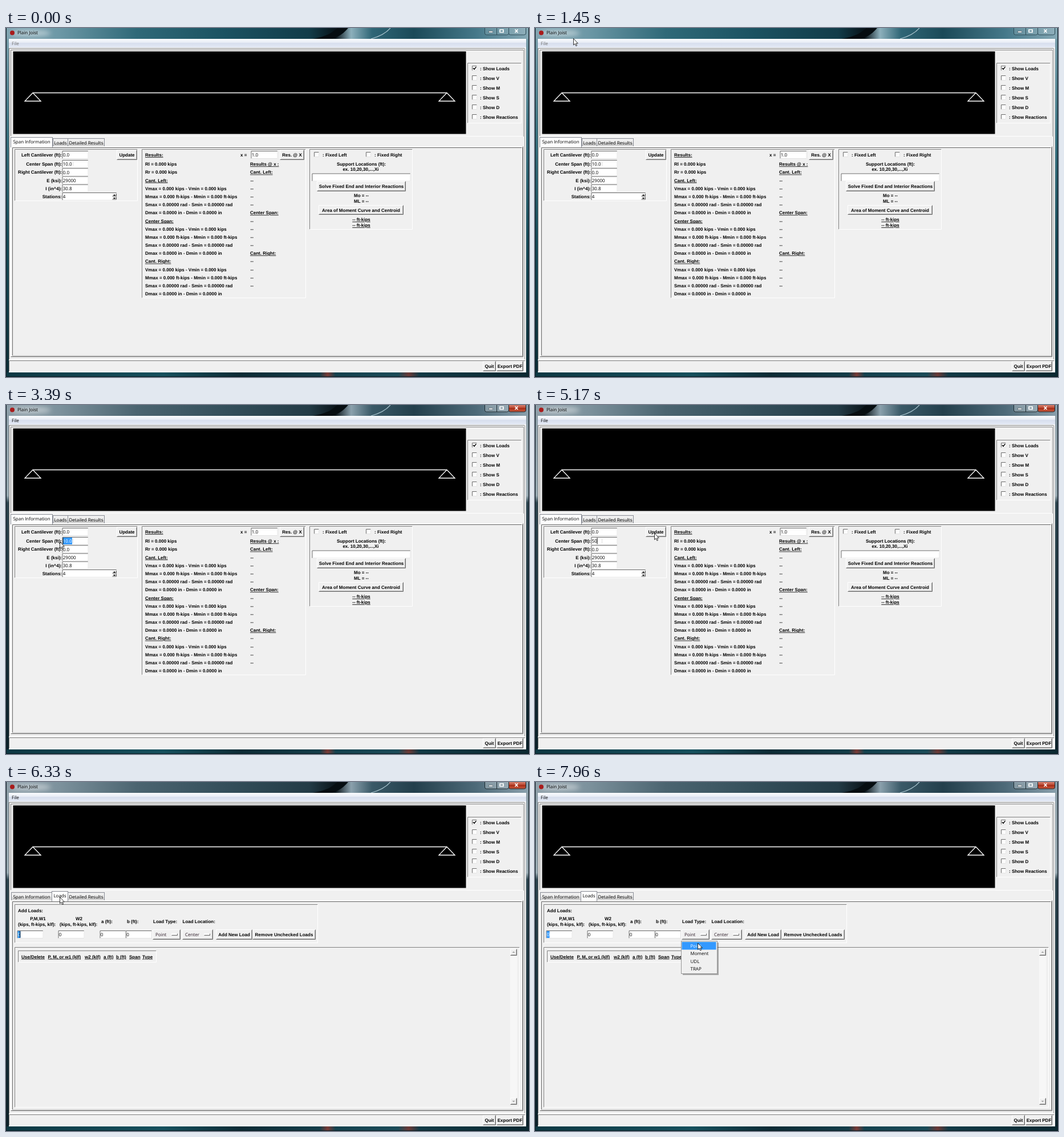
Recreate the animation shown at these times as an HTML page. Size 917x611 px, loop 8000 ms.

```html
<!DOCTYPE html>
<html lang="en">
<head>
<meta charset="utf-8">
<title>Plain Joist</title>
<style>
html, body { margin: 0; width: 100%; height: 100%; overflow: hidden; background: #f0f0f0; }
svg { display: block; width: 917px; height: 611px; }
text { font: 8px "Open Sans", "Noto Sans", sans-serif; white-space: pre; text-rendering: geometricPrecision; }
.b { font: bold 8px "Liberation Sans", Arial, sans-serif; }
.u { text-decoration: underline; }
</style>
</head>
<body>
<svg id="stage" viewBox="0 0 917 611" xmlns="http://www.w3.org/2000/svg"></svg>
<script>
const DURATION = 8000;
const FACE = '#f0f0f0', DARK = '#696969', MID = '#a0a0a0', BLUE = '#3399ff';

// ---- drawing helpers; text is placed by its vertical centre ----
const rect = (x, y, w, h, fill, extra = '') =>
  `<rect x="${x}" y="${y}" width="${w}" height="${h}" fill="${fill}" ${extra}/>`;
const path = (d, stroke, width = 1, fill = 'none') =>
  `<path d="${d}" stroke="${stroke}" stroke-width="${width}" fill="${fill}"/>`;
const group = (id, body, extra = '') => `<g id="${id}" ${extra}>${body}</g>`;
const text = (x, y, s, cls = '', anchor = 'start', fill = '#000', extra = '') =>
  `<text x="${x}" y="${y + 3}" class="${cls}" text-anchor="${anchor}" fill="${fill}" ${extra}>${s}</text>`;
const label = (x, y, s, anchor) => text(x, y, s, 'b', anchor);
const heading = (x, y, s, anchor) => text(x, y, s, 'b u', anchor);

function bevel(x, y, w, h, topLeft, bottomRight, fill = 'none') {
  const l = x + .5, t = y + .5, r = x + w - .5, b = y + h - .5;
  return rect(x, y, w, h, fill) +
    path(`M${l} ${b}V${t}H${r}`, topLeft) + path(`M${l} ${b}H${r}V${t}`, bottomRight);
}
const sunken = (x, y, w, h, fill) => bevel(x, y, w, h, '#808080', '#fff', fill);
const entry = (x, y, w, h, value = '') =>
  bevel(x, y, w, h, DARK, '#e3e3e3', '#fff') + text(x + 1.3, y + h / 2 + .3, value);
const raised = (x, y, w, h) =>
  bevel(x, y, w, h, '#fff', DARK, FACE) + path(`M${x + 1.5} ${y + h - 1.5}H${x + w - 1.5}V${y + 1.5}`, MID, .8);
const button = (x, y, w, h, s) => raised(x, y, w, h) + label(x + w / 2, y + h / 2 + .4, s, 'middle');
const optionButton = (x, w, s) => raised(x, 258, w, 18) + text(x + 5, 267, s, '', 'start', '#2b1a26') +
  bevel(x + w - 16, 265, 11, 4, '#fff', DARK, FACE);
const check = (x, y, on) => bevel(x, y, 9, 9, DARK, '#e3e3e3', '#fff') +
  (on ? path(`M${x + 2} ${y + 4}l2 2.3 3.4-4.2`, '#000', 1.5) : '');
const tab = (x, y, w, s, fill) =>
  rect(x + .5, y + .5, w - 1, 208 - y, fill, 'stroke="#898c95"') + text(x + w / 2, y + 7.5, s, '', 'middle');

const gradient = (id, stops, vertical) =>
  `<linearGradient id="${id}" x2="${vertical ? 0 : 1}" y2="${vertical ? 1 : 0}">` +
  stops.map(([at, color]) => `<stop offset="${at}" stop-color="${color}"/>`).join('') + '</linearGradient>';

// ---- window parts ----
const defs = '<defs>' +
  gradient('idleTitle', [[0, '#7fa3b0'], [.1, '#6d98a6'], [.25, '#2f6978'], [.42, '#1b5261'], [.58, '#123c49'],
    [.63, '#081319'], [.66, '#8db0bc'], [.7, '#2f6676'], [.78, '#1b4a58'], [.9, '#46798a'], [1, '#86a9b6']]) +
  gradient('busyTitle', [[0, '#8d9ea8'], [.1, '#7d929d'], [.25, '#4b6470'], [.42, '#344f5b'], [.58, '#233b46'],
    [.63, '#0b151b'], [.66, '#8ba1ad'], [.7, '#3a5967'], [.78, '#233f4c'], [.9, '#4e6a79'], [1, '#8ba1ae']]) +
  gradient('idleSide', [[0, '#7fa3b0'], [.3, '#3a7382'], [.6, '#174b59'], [1, '#0b2c36']], true) +
  gradient('busySide', [[0, '#8d9ea8'], [.26, '#9aabb4'], [.28, '#2c444f'], [.65, '#162f3a'], [1, '#0b2029']], true) +
  gradient('foot', [[0, '#0d3843'], [.3, '#16505d'], [.45, '#0c2b35'], [.6, '#143d49'], [.615, '#7a3a35'],
    [.63, '#14414e'], [.75, '#1b4b58'], [.77, '#6b3835'], [.79, '#123a46'], [1, '#0a2831']]) +
  gradient('menuBar', [[0, '#fbfcfe'], [.45, '#e6ebf5'], [.5, '#d8dfee'], [1, '#e2e8f4']], true) +
  gradient('tabFace', [[0, '#f3f3f3'], [.5, '#ebebeb'], [.5, '#dddddd'], [1, '#cfcfcf']], true) +
  gradient('tabHot', [[0, '#eaf6fd'], [.5, '#d9f0fc'], [.5, '#bee6fd'], [1, '#a7d9f5']], true) +
  gradient('close', [[0, '#d99a8c'], [.5, '#c2523c'], [.55, '#a52c17'], [1, '#c9573a']], true) +
  '<filter id="blur" x="-20%" y="-100%" width="140%" height="300%"><feGaussianBlur stdDeviation="4"/></filter>' +
  '<clipPath id="picked"><rect id="pickedBox" y="232" width="0" height="12"/></clipPath></defs>';

const chrome = state => rect(0, 0, 917, 611, `url(#${state}Side)`) +
  rect(0, 0, 917, 19, `url(#${state}Title)`) +
  path('M538 19C566 14 575 6 580 0H600C592 9 586 14 572 19Z', 'none', 0, '#060d11') +
  path('M640 19C658 14 668 7 674 0', '#a8c3cd', 1.2) +
  rect(0, 603, 917, 8, 'url(#foot)') +
  path('M.5 0V611M916.5 0V611M0 610.5H917', '#0a1a20');

const controls = active => {
  const edge = active ? '#1c2a31' : '#2d4c58';
  return rect(839.5, -3, 42, 15, '#fff', `fill-opacity="${active ? .25 : .1}" stroke="${edge}" rx="3"`) +
    rect(881.5, -3, 30, 15, active ? 'url(#close)' : '#fff', `fill-opacity="${active ? 1 : .1}" stroke="${edge}" rx="3"`) +
    path('M860.5 0V12', edge) + rect(846.5, 5.5, 7, 2.5, '#fff', 'stroke="#45545c" stroke-width=".6"') +
    path('M866 3H872V7.5H866Z', '#fff', 1.7) + path('M892.5 2.5l5 5.5m0-5.5l-5 5.5', '#fff', 1.7);
};

const shell = group('idle', chrome('idle') + controls(false)) + group('busy', chrome('busy') + controls(true)) +
  '<ellipse cx="43" cy="9" rx="36" ry="6" fill="#fff" opacity=".45" filter="url(#blur)"/>' +
  '<circle cx="11" cy="8.5" r="4" fill="#a81c1c"/>' + text(20, 8.3, 'Plain Joist') +
  rect(5, 19, 907, 584, FACE) + rect(5, 19, 907, 15, 'url(#menuBar)') + path('M5 34.5H912', '#fff') +
  text(10, 26.5, 'File', '', 'start', '#6d6d6d', 'id="file"') +
  sunken(5, 35, 905, 546) + sunken(8, 38, 900, 152) + path('M907.5 38V190M909.5 36V580', MID) +
  rect(12.5, 41, 794, 144.5, '#000') +
  path('M47 113.5H773', '#fff', 1.5) +
  [47, 773].map(x => path(`M${x} 113.5l14 14.5h-28Z`, '#fff', 1.3)).join('') +
  sunken(809, 61, 95, 106) +
  ['Loads', 'V', 'M', 'S', 'D', 'Reactions'].map((s, i) =>
    check(817, 66 + 17 * i, !i) + label(831, 71 + 17 * i, ': Show ' + s)).join('') +
  sunken(5, 582, 906, 20) + button(836, 583, 23, 18, 'Quit') + button(860, 583, 47, 18, 'Export PDF');

const pane = bevel(8, 207, 899, 369, '#fff', DARK, FACE) + bevel(11, 209, 894, 365, DARK, '#fff') +
  path('M905.5 209V574H11', MID);

// ---- "Span Information" page ----
const rows = ['Left Cantilever (ft):', 'Center Span (ft):', 'Right Cantilever (ft):', 'E (ksi):', 'I (in^4):', 'Stations:'];
const values = ['0.0', '', '0.0', '29000', '30.8', '4'];
const rowY = [222, 238, 252.3, 266.5, 280.7, 295];

const extremes = [
  'Vmax = 0.000 kips - Vmin = 0.000 kips', 'Mmax = 0.000 ft-kips - Mmin = 0.000 ft-kips',
  'Smax = 0.00000 rad - Smin = 0.00000 rad', 'Dmax = 0.0000 in - Dmin = 0.0000 in'];
const spans = ['Cant. Left:', 'Center Span:', 'Cant. Right:'];
const resultY = i => 238.3 + 14.18 * i;

const results = label(244, resultY(0), 'Rl = 0.000 kips') + label(244, resultY(1), 'Rr = 0.000 kips') +
  heading(428, resultY(0), 'Results @ x :') +
  spans.map((s, i) => {
    const top = 2 + 5 * i;
    return heading(244, resultY(top), s) + heading(428, resultY(top - 1), s) +
      extremes.map((e, k) => label(244, resultY(top + 1 + k), e) + label(428.5, resultY(top + k), '--')).join('');
  }).join('');

const spanPage = tab(82, 193, 27, 'Loads', 'url(#tabFace)') +
  group('hotTab', tab(82, 193, 27, 'Loads', 'url(#tabHot)')) +
  tab(108, 193, 65, 'Detailed Results', 'url(#tabFace)') + pane +
  tab(8, 191, 74, 'Span Information', '#fff') + rect(9, 207, 72, 2, '#fff') +
  sunken(15, 212, 216, 91) +
  rows.map((s, i) => label(98, rowY[i], s, 'end') +
    entry(98.5, rowY[i] - 7, i === 5 ? 96 : 46, 14, values[i])).join('') +
  raised(186, 289.5, 8, 5.5) + raised(186, 295, 8, 5.5) +
  path('M188 293.5h4l-2-2.4ZM188 297h4l-2 2.4Z', 'none', 0, '#000') +
  group('update', '') +
  sunken(238, 212, 288, 261) + heading(244, 222, 'Results:') + label(411, 222, 'x =') +
  entry(429.5, 215, 47, 14, '1.0') + button(480, 213, 43, 18, 'Res. @ X') + results +
  sunken(532, 212, 181, 141) + check(540, 217) + label(555, 222, ': Fixed Left') +
  check(631, 217) + label(646, 222, ': Fixed Right') +
  label(623, 237.5, 'Support Locations (ft):', 'middle') + label(622, 247.3, 'ex. 10,20,30,...,Xi', 'middle') +
  entry(536.5, 254.5, 173, 14) + button(545, 268, 156, 18, 'Solve Fixed End and Interior Reactions') +
  label(623, 293, 'Mo = --', 'middle') + label(623, 302.7, 'ML = --', 'middle') +
  button(548, 310, 149, 17, 'Area of Moment Curve and Centroid') +
  heading(623, 335, '-- ft-kips', 'middle') + heading(623, 345, '-- ft-kips', 'middle') +
  text(99.8, 238.3, '', '', 'start', '#000', 'id="length"') +
  group('selection', rect(99.5, 232, 16.5, 12, BLUE) + text(99.8, 238.3, '10.0', '', 'start', '#fff'), 'clip-path="url(#picked)"') +
  path('M117.5 234V242', '#ddd');

// ---- "Loads" page ----
const arrowBox = (y, dir) => raised(884, y, 12, 12) + path(`M887.5 ${y + 6 + dir}h5l-2.5 ${-2.5 * dir}Z`, 'none', 0, MID);

const loadsPage = tab(9, 193, 72, 'Span Information', 'url(#tabFace)') +
  tab(108, 193, 65, 'Detailed Results', 'url(#tabFace)') + pane +
  tab(80, 191, 29, 'Loads', '#fff') + rect(81, 207, 27, 2, '#fff') +
  sunken(15, 214, 532, 68) + label(21, 225, 'Add Loads:') +
  label(56, 239, 'P,M,W1', 'middle') + label(21, 249, '(kips, ft-kips, klf):') +
  label(128, 239, 'W2', 'middle') + label(94, 249, '(kips, ft-kips, klf):') +
  label(167, 244, 'a (ft):') + label(212, 244, 'b (ft):') +
  label(258, 244, 'Load Type:') + label(309.5, 244, 'Load Location:') +
  [19.5, 91.5, 164.5, 210].map(x => entry(x, 260, 46, 14, '0')).join('') +
  rect(20.5, 261, 5, 12, BLUE) + text(20.8, 267.3, '0', '', 'start', '#fff') +
  optionButton(257, 49, 'Point') + optionButton(309, 54, 'Center') +
  button(368, 258, 64, 18, 'Add New Load') + button(432, 258, 111, 18, 'Remove Unchecked Loads') +
  sunken(15, 289, 886, 281) + sunken(21, 295, 243, 21) +
  [[27, 'Use/Delete'], [73.5, 'P, M, or w1 (klf)'], [138, 'w2 (klf)'], [171, 'a (ft)'], [193, 'b (ft)'],
    [216, 'Span'], [239, 'Type']].map(([x, s]) => heading(x, 305.7, s)).join('') +
  rect(884, 292, 12, 273, '#f7f7f7') + arrowBox(292, 1) + arrowBox(553, -1) +
  group('menu', rect(259, 281, 63, 57, '#000', 'opacity=".3"') +
    rect(256.5, 278.5, 63, 57, FACE, 'stroke="#979797"') +
    rect(257.5, 280, 60, 13.5, BLUE, 'id="menuHot"') +
    ['Point', 'Moment', 'UDL', 'TRAP'].map((s, i) =>
      text(272.5, 287 + 13.4 * i, s, '', 'start', '#000', i ? '' : 'id="menuFirst"')).join(''));

const pointers = rect(0, 0, 1, 11, '#000', 'id="caret"') +
  group('arrow', path('M.5.5V11.8L3 9.5 4.9 13.5 6.6 12.7 4.8 8.9H8.3Z', '#000', .8, '#fff')) +
  group('beam', path('M-2.5-5.5H2.5M0-5.5V5.5M-2.5 5.5H2.5', '#000', .9));

document.getElementById('stage').innerHTML =
  defs + shell + group('spanPage', spanPage) + group('loadsPage', loadsPage) + pointers;

// ---- motion ----
const el = id => document.getElementById(id);
const show = (id, on) => el(id).setAttribute('visibility', on ? 'inherit' : 'hidden');
const fade = (id, v) => el(id).setAttribute('opacity', v);
const place = (id, x, y) => el(id).setAttribute('transform', `translate(${x} ${y})`);

// Share of a change done by t, when it runs from a to b in n even steps.
function stepped(t, a, b, n) {
  if (t < a) return 0;
  return Math.min(n, 1 + Math.floor((t - a + 4) / ((b - a) / (n - 1)))) / n;
}

// start, end, steps, points passed at even shares
const moves = [
  [70, 150, 2, [651, 520], [575, 487]],
  [300, 530, 4, [173, 251]],
  [690, 990, 5, [29, 77]],
  [1140, 1840, 10, [7, 45], [67, 18], [86, 115], [94, 212]],
  [1990, 2290, 5, [117, 238]],
  [2460, 2690, 4, [94, 239]],
  [4400, 4940, 8, [150, 244], [209, 224]],
  [5630, 6250, 9, [94, 201]],
  [6650, 7260, 9, [272, 268]],
  [7810, 7960, 3, [285, 281.5]]
];

function pointerAt(t) {
  let at = [727, 553];
  for (const [a, b, n, ...points] of moves) {
    if (t < a) break;
    const p = stepped(t, a, b, n), way = [at, ...points];
    const u = p * p * (3 - 2 * p) * points.length;
    const i = Math.min(points.length - 1, Math.floor(u));
    at = way[i].map((v, k) => v + (way[i + 1][k] - v) * (u - i));
  }
  return at;
}

const caretSpans = [[2460, 3070], [3390, 3930], [4250, 4870], [5170, 5770], [6070, 6930], [7230, 7830]];
let pressed = null;

function draw(t) {
  const [x, y] = pointerAt(t);
  const loads = t >= 6330;
  const dragging = t >= 2460 && t < 2690;
  const overEntry = !loads && t > 1840 && x > 99 && x < 144 && y > 231 && y < 246;
  const beam = dragging || overEntry;

  fade('busy', stepped(t, 2460, 2690, 4));
  el('file').setAttribute('fill', t < 2460 ? '#6d6d6d' : '#000');
  show('spanPage', !loads);
  show('loadsPage', loads);
  show('hotTab', !loads && t > 5600 && x > 82 && x < 109 && y < 208);

  const down = t >= 5400 && t < 5480;
  if (down !== pressed) {
    pressed = down;
    el('update').innerHTML = down
      ? bevel(194, 213, 36, 18, DARK, '#fff', FACE) + label(212.5, 223, 'Update', 'middle')
      : button(194, 213, 36, 18, 'Update');
  }

  const selecting = t >= 2460 && t < 3770;
  const left = Math.min(116, Math.max(99.5, x));
  el('length').textContent = t < 3770 ? '10.0' : t < 3850 ? '5' : '50';
  el('pickedBox').setAttribute('x', left);
  el('pickedBox').setAttribute('width', selecting ? 116 - left : 0);

  show('caret', caretSpans.some(([a, b]) => t >= a && t < b));
  if (loads) place('caret', 24, 261.5);
  else place('caret', selecting ? left : t < 3850 ? 104.5 : 108.5, 232.5);

  show('menu', t >= 7490);
  fade('menu', stepped(t, 7490, 7660, 3));
  const hot = t >= 7890;
  fade('menuHot', hot ? 1 : 0);
  el('menuFirst').setAttribute('fill', hot ? '#fff' : '#000');

  show('arrow', t >= 70 && !beam);
  show('beam', beam);
  place('arrow', x, y);
  place('beam', x, y);
}

const start = performance.now();
function tick() {
  draw((performance.now() - start) % DURATION);
  requestAnimationFrame(tick);
}
tick();
</script>
</body>
</html>
```
